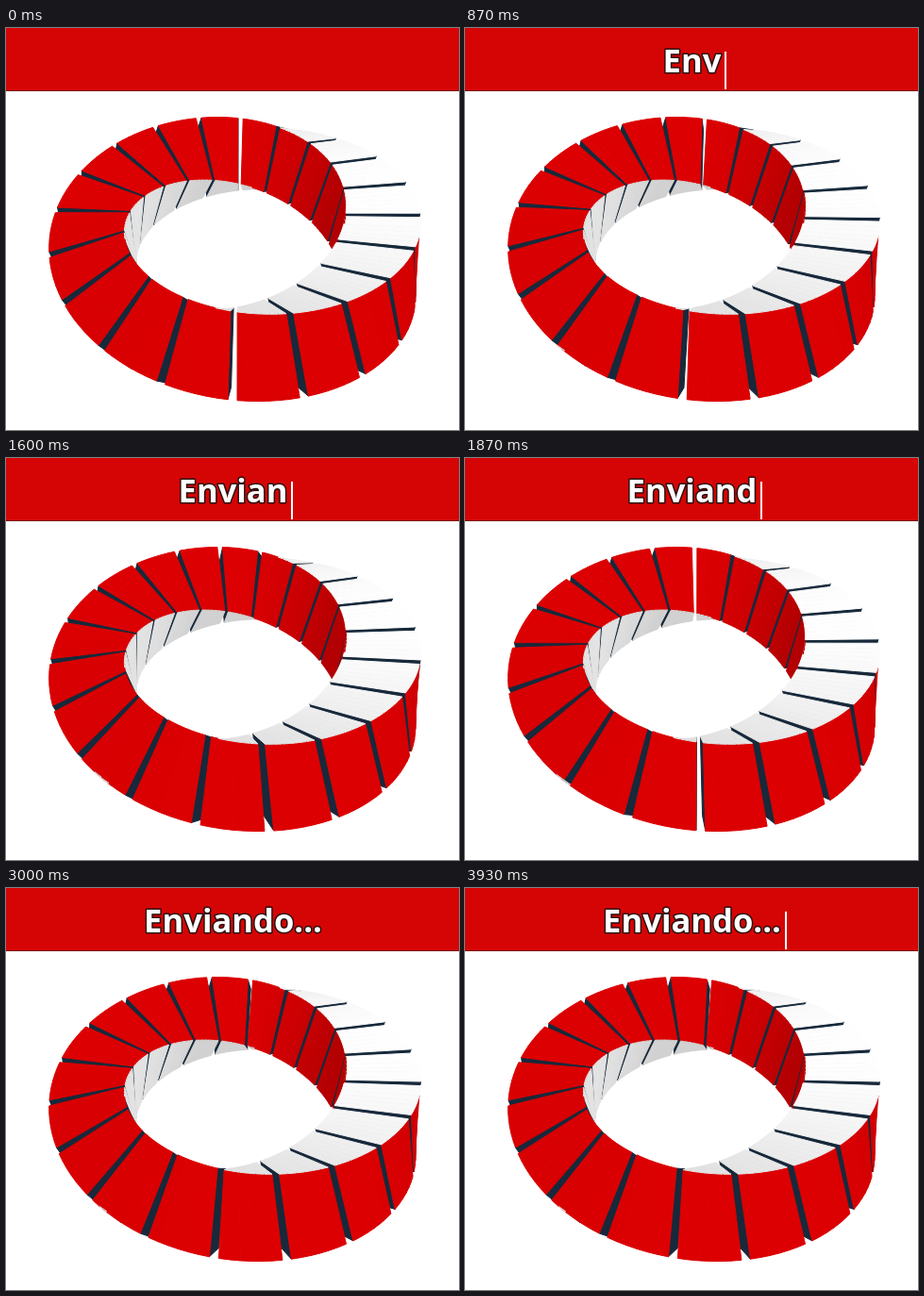
Recreate the animation shown at these times as an HTML page with a canvas. Size 480 px wide and 426 px high, loop 3990 ms.

```html
<!DOCTYPE html>
<html lang="es">
<head>
<meta charset="utf-8">
<title>Enviando...</title>
<style>
  html, body { margin: 0; height: 100%; overflow: hidden; background: #fff; }
  canvas { display: block; }
</style>
</head>
<body>
<canvas id="stage" width="480" height="426"></canvas>
<script>
const ctx = document.getElementById('stage').getContext('2d');
const LOOP = 3990, FPS = 15;
const MESSAGE = 'Enviando...';
const BLOCKS = 20, SLICES = 6, GAP = 1.15;     // gap in degrees on each side
const PHASE = -0.07;                           // resting offset, in blocks
const RADIUS = 154, CORNER = 55.6;             // ring radius, half diagonal of the section
const CX = 245.5, CY = 224.7, DIST = 820, FOCAL = 793;
const rad = deg => deg * Math.PI / 180;
const sinE = Math.sin(rad(43)), cosE = Math.cos(rad(43));

// Angles run from the right side, through the front, to the left.
function corner(angle, j) {
  const twist = rad(angle / 2 - 45 + 90 * j), a = rad(angle);
  const r = RADIUS + CORNER * Math.cos(twist), z = CORNER * Math.sin(twist);
  const x = r * Math.cos(a), front = r * Math.sin(a);
  const scale = FOCAL / (DIST - z * sinE - front * cosE);
  return [CX + x * scale, CY - (z * cosE - front * sinE) * scale];
}

function section(angle) {
  return [0, 1, 2, 3].map(j => corner(angle, j));
}

// Fills a face only when it is turned to the viewer.
function face(points, color) {
  let area = 0;
  points.forEach(([x, y], i) => {
    const [u, v] = points[(i + 1) % points.length];
    area += x * v - u * y;
  });
  if (area >= 0) return;
  ctx.beginPath();
  points.forEach(p => ctx.lineTo(...p));
  ctx.closePath();
  ctx.fillStyle = ctx.strokeStyle = color;
  ctx.fill();
  ctx.stroke();
}

function shade(angle, j) {
  const normal = rad(angle / 2 + 90 * j), a = rad(angle);
  const side = 0.35 * Math.cos(a) + 0.4 * Math.sin(a);
  const light = side * Math.cos(normal) + 0.8 * Math.sin(normal);
  const k = 0.82 + 0.18 * Math.min(1, Math.max(0, light * 1.2));
  const [r, g, b] = j % 2 ? [255, 255, 255] : [220, 0, 2];
  return `rgb(${r * k},${g * k},${b * k})`;
}

function drawSlice({ from, to, first, last }) {
  const mid = (from + to) / 2, a = section(from), b = section(to);
  const cap = '#17293b';
  if (first) face([...a].reverse(), cap);
  if (last) face(b, cap);
  for (let j = 0; j < 4; j++) {
    const k = (j + 1) % 4;
    face([a[j], a[k], b[k], b[j]], shade(mid, j));
  }
}

function drawRing(phase) {
  const step = 360 / BLOCKS, size = (step - 2 * GAP) / SLICES, slices = [];
  for (let i = 0; i < BLOCKS; i++) {
    for (let s = 0; s < SLICES; s++) {
      const from = step * (i - phase) + GAP + s * size;
      slices.push({ from, to: from + size, first: s === 0, last: s === SLICES - 1 });
    }
  }
  const nearness = s => Math.sin(rad((s.from + s.to) / 2));
  slices.sort((a, b) => nearness(a) - nearness(b));
  ctx.lineWidth = 1;
  ctx.lineJoin = 'round';
  slices.forEach(drawSlice);
}

function drawBanner(tick) {
  ctx.fillStyle = '#d60505';
  ctx.fillRect(0, 0, 480, 66);
  ctx.fillStyle = '#7a0a0a';
  ctx.fillRect(0, 66, 480, 1);
  const text = MESSAGE.slice(0, Math.floor(tick / 4));
  ctx.font = 'bold 34.6px "Noto Sans", "Open Sans", sans-serif';
  ctx.textAlign = 'center';
  ctx.lineWidth = 3;
  ctx.strokeStyle = '#2a1010';
  ctx.strokeText(text, 240.5, 47);
  ctx.fillStyle = '#fff';
  ctx.fillText(text, 240.5, 47);
  if (Math.floor(tick / 7.5) % 2) {
    ctx.fillRect(Math.round(244.5 + ctx.measureText(text).width / 2), 25, 2, 40);
  }
}

function draw() {
  const time = performance.now() % LOOP;
  const tick = Math.floor((time + 3.4) * FPS / 1000);
  ctx.fillStyle = '#fff';
  ctx.fillRect(0, 0, 480, 426);
  drawRing(PHASE + Math.floor(tick * 1.2 + 1e-6) / 8 % 1);
  drawBanner(tick);
  requestAnimationFrame(draw);
}
draw();
</script>
</body>
</html>
```
